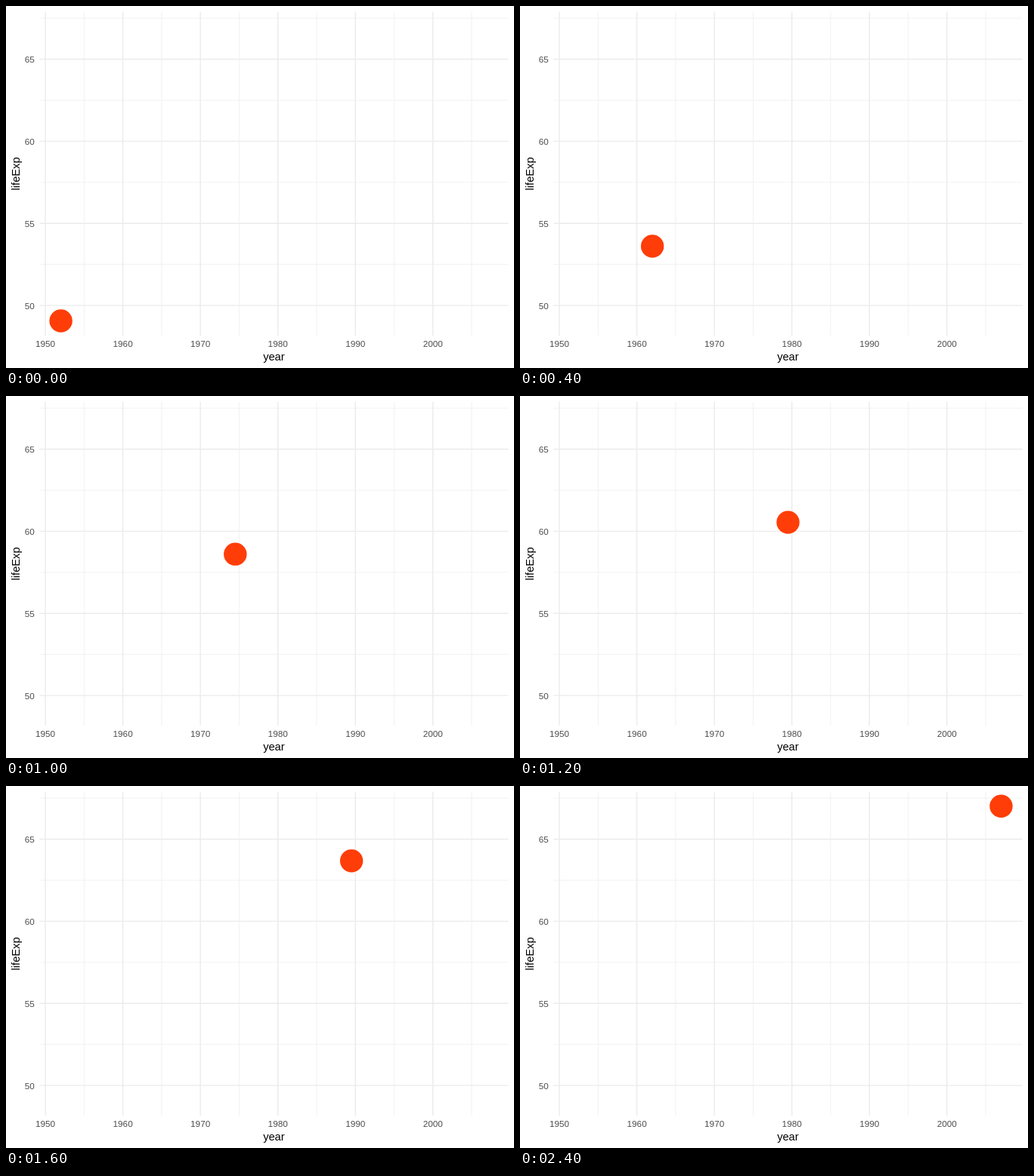
Animation of 672 by 480 pixels, one loop 5 s. Source, as an HTML page:

```html
<!DOCTYPE html>
<html lang="en">
<head>
<meta charset="utf-8">
<title>Life expectancy by year</title>
<style>
  html, body { margin: 0; width: 100%; height: 100%; overflow: hidden; background: #fff; }
  svg { display: block; width: 672px; height: 480px; }
  text { font-family: "Liberation Sans", Arial, Helvetica, sans-serif; }
  .tick { font-size: 11.73px; fill: #4d4d4d; }
  .title { font-size: 14.67px; fill: #000; text-anchor: middle; }
  .minor { stroke: #ebebeb; stroke-width: .71; }
  .major { stroke: #ebebeb; stroke-width: 1.42; }
</style>
</head>
<body>
<svg viewBox="0 0 672 480">
  <g id="grid"></g>
  <circle id="dot" r="15.2" fill="#ff3d08"/>
  <g id="labels"></g>
  <text class="title" x="354.4" y="469.7">year</text>
  <text class="title" transform="translate(17.9 222.4) rotate(-90)">lifeExp</text>
</svg>
<script>
const NS = 'http://www.w3.org/2000/svg';
const LOOP = 5000, STEP = 100;
const left = 44.4, right = 664.67, top_ = 7.6, bottom = 436.9;

const px = year => 52.1 + (year - 1950) * 10.252;
const py = life => 397.1 - (life - 50) * 21.77;

// One reading every five years from 1952
const life = [49.06, 51.51, 53.61, 55.68, 57.65, 59.57, 61.53, 63.21, 64.16, 65.01, 65.69, 67.01];
// Step at which each reading is reached
const keys = [0, 2, 4, 7, 9, 11, 13, 15, 17, 20, 22, 24];

function add(parent, tag, attrs, text) {
  const el = document.createElementNS(NS, tag);
  for (const name in attrs) el.setAttribute(name, attrs[name]);
  if (text !== undefined) el.textContent = text;
  document.getElementById(parent).appendChild(el);
}

const vLine = (year, cls) =>
  add('grid', 'line', { class: cls, x1: px(year), x2: px(year), y1: top_, y2: bottom });
const hLine = (value, cls) =>
  add('grid', 'line', { class: cls, x1: left, x2: right, y1: py(value), y2: py(value) });

for (let y = 1955; y <= 2005; y += 10) vLine(y, 'minor');
for (let v = 52.5; v <= 67.5; v += 5) hLine(v, 'minor');
for (let y = 1950; y <= 2000; y += 10) {
  vLine(y, 'major');
  add('labels', 'text', { class: 'tick', x: px(y), y: 452, 'text-anchor': 'middle' }, y);
}
for (let v = 50; v <= 65; v += 5) {
  hLine(v, 'major');
  add('labels', 'text', { class: 'tick', x: 37.9, y: py(v) + 4.4, 'text-anchor': 'end' }, v);
}

const dot = document.getElementById('dot');

function draw(ms) {
  const step = Math.min(24, Math.floor(ms / STEP));
  let i = 0;
  while (i < keys.length - 2 && step >= keys[i + 1]) i++;
  const f = (step - keys[i]) / (keys[i + 1] - keys[i]);
  dot.setAttribute('cx', px(1952 + 5 * (i + f)));
  dot.setAttribute('cy', py(life[i] + (life[i + 1] - life[i]) * f));
}

const start = performance.now();
function tick() {
  draw((performance.now() - start) % LOOP);
  requestAnimationFrame(tick);
}
tick();
</script>
</body>
</html>
```
